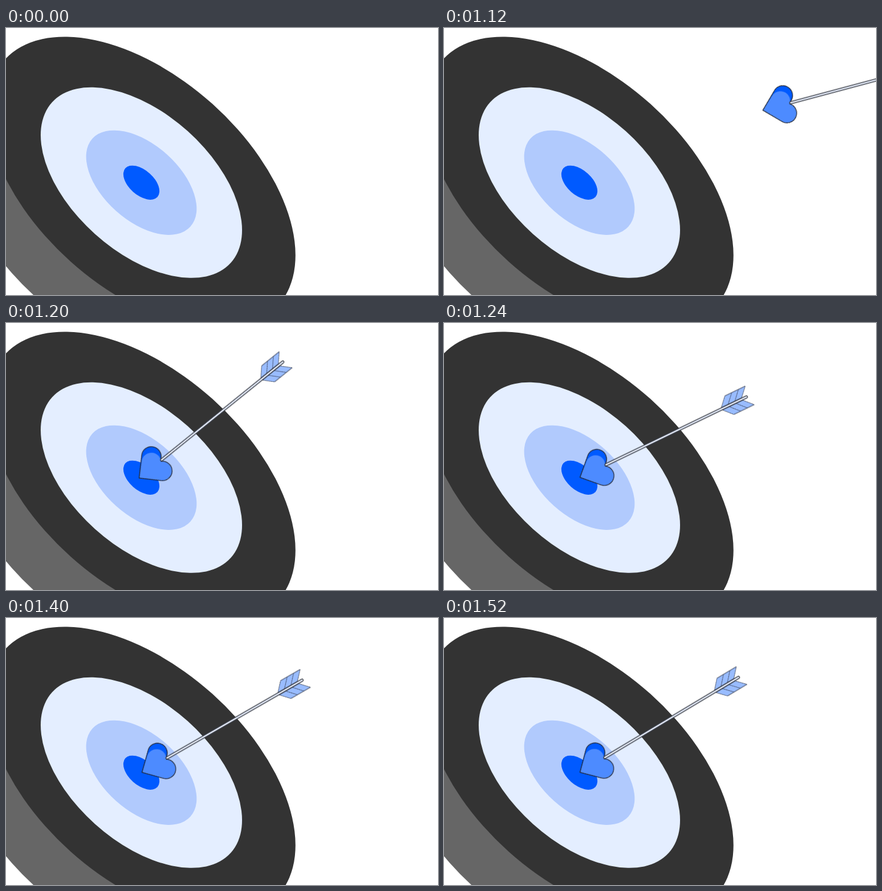
Animation, 710 px wide and 440 px high, one loop 3 s. Source, as an HTML page:

```html
<!DOCTYPE html>
<html lang="en">
<head>
<meta charset="utf-8">
<title>Arrow and dartboard</title>
<style>
  html, body { margin: 0; width: 100%; height: 100%; overflow: hidden; background: #fff; }
  svg { display: block; width: 710px; height: 440px; }
  #arrow { transform-origin: 0 0; visibility: hidden; }
  .ink { fill: none; stroke: #20242e; stroke-width: 1.2; stroke-linejoin: round; }
  .feather { fill: #99bcff; stroke: #3a4356; stroke-width: 1; }
  .shaft { stroke-linecap: round; }
</style>
</head>
<body>
<svg viewBox="0 0 710 440">
  <g transform="translate(222.5 254.8) rotate(42)">
    <path fill="#666" d="M-302.4 0V82A302.4 174.5 0 0 0 302.4 82V0Z"/>
    <ellipse rx="302.4" ry="174.5" fill="#333"/>
    <ellipse rx="197.6" ry="114" fill="#e4eeff"/>
    <ellipse rx="108.4" ry="62.6" fill="#b1cafd"/>
    <ellipse rx="35.4" ry="20.4" fill="#005aff"/>
  </g>
  <g id="arrow">
    <!-- tip at the origin, shaft along +x -->
    <path fill="#005aff" d="M0 0L26.8 -26.4A16 16 0 1 1 48 -2.5L45.3 1.3Z"/>
    <path fill="#4d8bff" d="M0 0L21.2 -19.3A16 16 0 0 1 45.3 1.3A16 16 0 1 1 25.6 26.2Z"/>
    <path class="ink" d="M0 0L26.8 -26.4A16 16 0 1 1 48 -2.5L45.3 1.3A16 16 0 1 1 25.6 26.2Z"/>
    <g class="feather">
      <path d="M259 -2L272.8 -17H310L296 -2ZM271.5 -2L285.3 -17M283.8 -2L297.6 -17"/>
      <path d="M259 2L272.8 17H310L296 2ZM271.5 2L285.3 17M283.8 2L297.6 17"/>
    </g>
    <path class="shaft" d="M47.5 0H304" stroke="#2a2e38" stroke-width="4.8"/>
    <path class="shaft" d="M47.5 0H304" stroke="#e4eaf8" stroke-width="2.4"/>
  </g>
</svg>
<script>
  const LOOP = 3000, START = 1080, STEP = 40;
  const REST = [223.5, 254.4];

  // tip x, tip y, angle: flight and impact
  const flight = [
    [652.5, 85, -8],
    [524, 135.5, -15],
    [385, 190, -22],
    [218.8, 255.5, -39]
  ];
  // angles while the stuck arrow quivers
  const quiver = [-25.85, -35.1, -27.9, -33.1, -30, -31, -31.4, -31];

  const poses = [...flight, ...quiver.map(a => [...REST, a])];
  const pose = ([x, y, a], visibility) => ({
    transform: `translate(${x}px, ${y}px) rotate(${a}deg)`,
    visibility,
    easing: 'step-end'
  });

  const frames = [
    { offset: 0, ...pose(poses[0], 'hidden') },
    ...poses.map((p, i) => ({ offset: (START + i * STEP) / LOOP, ...pose(p, 'visible') })),
    { offset: 1, ...pose(poses[poses.length - 1], 'visible') }
  ];
  document.getElementById('arrow').animate(frames, { duration: LOOP, iterations: Infinity });
</script>
</body>
</html>
```
